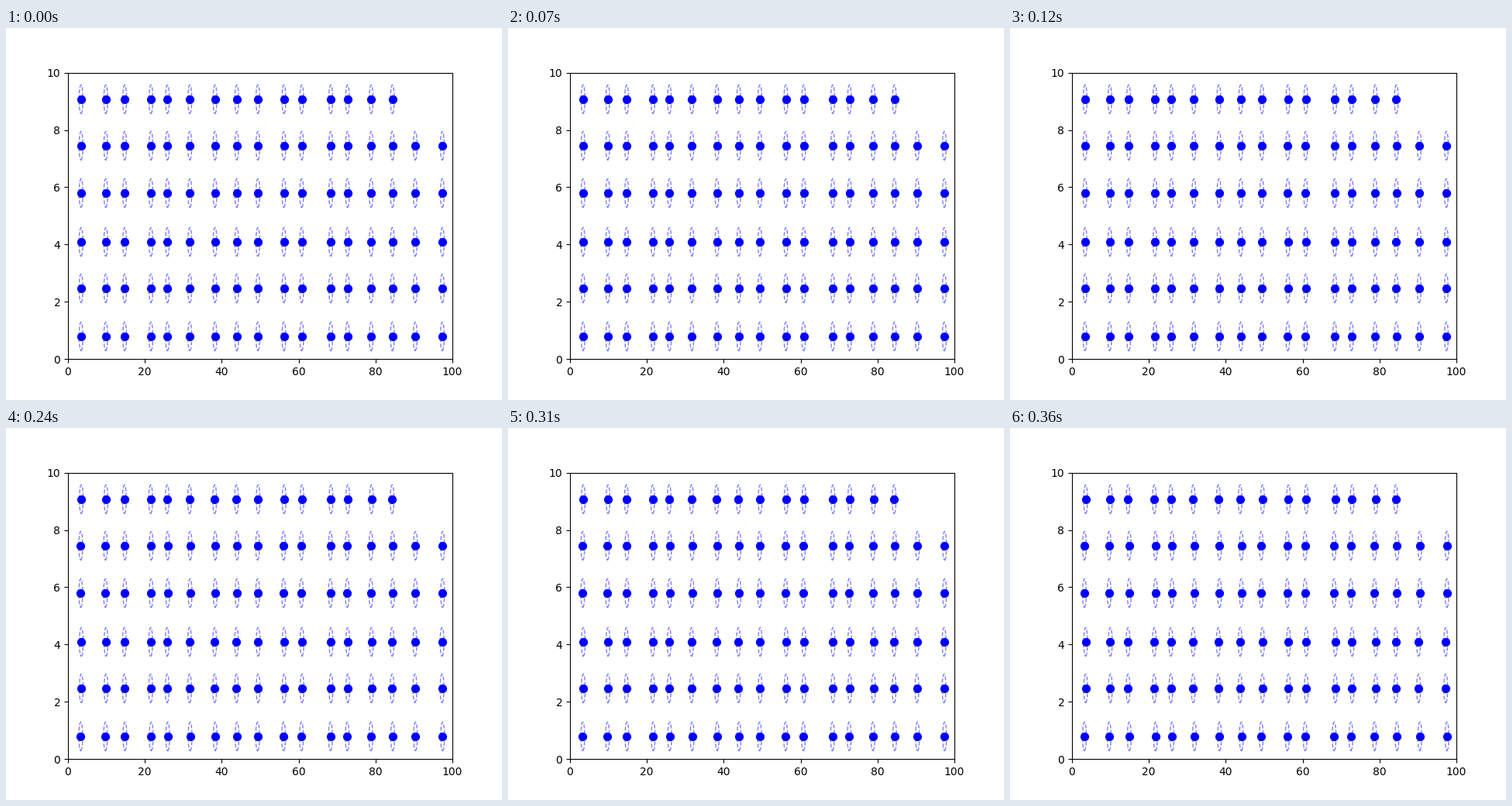
Recreate the animation shown at these times as a matplotlib script. Size 640 by 480 pixels, loop 0.48 s.

```python
import numpy as np
import matplotlib.pyplot as plt
from matplotlib.animation import FuncAnimation
from matplotlib.patches import Circle

FRAMES, INTERVAL = 4, 120
COUNT, RADIUS = 100, 0.5
ACCEL = 0.0175  # x shift per frame squared

# jittered lattice, filled row by row from the bottom
cols = [3.387, 9.819, 14.738, 21.573, 25.867, 31.694, 38.226, 43.901, 49.395,
        56.159, 60.796, 68.347, 72.712, 78.871, 84.385, 90.323, 97.379]
rows = [0.79, 2.467, 4.09, 5.795, 7.446, 9.07]
x, y = (grid.ravel()[:COUNT] for grid in np.meshgrid(cols, rows))

# groups of particles drift left or right
row, col = np.divmod(np.arange(COUNT), len(cols))
drift = np.sign(np.sin(np.pi * (col - 1.5) / 6) * np.cos(np.pi * (row + 0.5) / 2))

fig, ax = plt.subplots(figsize=(6.4, 4.8), dpi=100)
ax.set_xlim(0, 100)
ax.set_ylim(0, 10)

rings = [ax.add_patch(Circle(p, RADIUS, fill=False, ec="blue", ls="--",
                             lw=1, alpha=0.5)) for p in zip(x, y)]
dots = ax.scatter(x, y, s=50, color="blue")


def update(frame):
    pos = np.column_stack([x + drift * ACCEL * frame ** 2, y])
    dots.set_offsets(pos)
    for ring, p in zip(rings, pos):
        ring.center = p
    return [dots, *rings]


anim = FuncAnimation(fig, update, frames=FRAMES, interval=INTERVAL,
                     init_func=lambda: update(0), repeat=True, repeat_delay=0)
plt.show()
```
